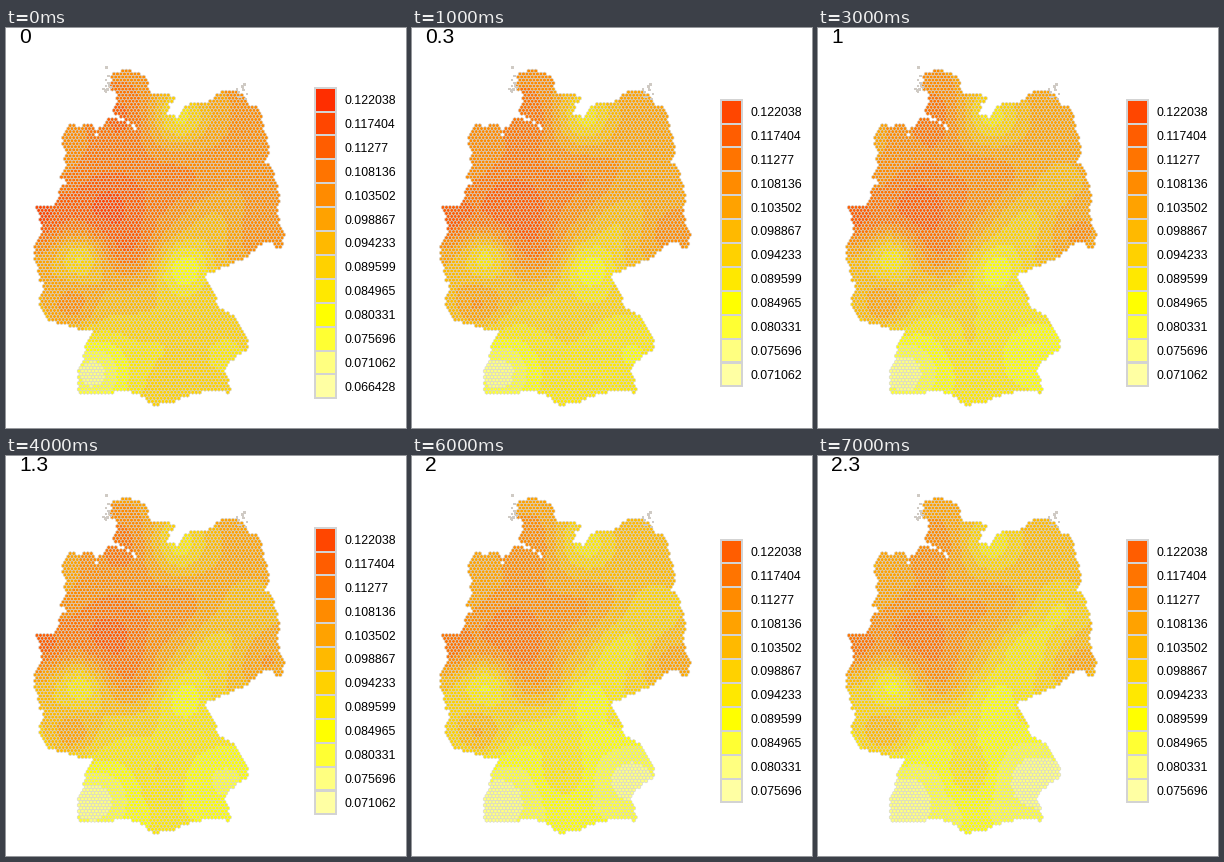
Animation, 400 px wide and 400 px high, one loop 8000 ms. Source, as a matplotlib script:

```python
import numpy as np
import matplotlib.pyplot as plt
from matplotlib.animation import FuncAnimation
from matplotlib.collections import PolyCollection
from matplotlib.patches import Rectangle
from matplotlib.path import Path

SIZE, DPI = 400, 100
PT = 72 / DPI
GREY = "#d3d3d3"
FONT = "Liberation Sans"
FRAMES, LEVELS = 8, 13
DX = 3.5          # width of one hexagon
BOX = 23.9        # height of one legend box
rng = np.random.default_rng(4)

# Key points of the border, clockwise from the north
BORDER = [
    (105, 44), (139, 47), (145, 65), (168, 69), (162, 86), (171, 89),
    (180, 79), (200, 74), (210, 66), (232, 62), (240, 73), (256, 88),
    (263, 124), (259, 133), (268, 146), (271, 185), (279, 207), (273, 222),
    (264, 213), (249, 223), (199, 247), (213, 281), (238, 302), (244, 320),
    (219, 342), (225, 365), (204, 363), (178, 369), (148, 377), (124, 362),
    (100, 367), (72, 366), (76, 333), (89, 303), (45, 294), (38, 287),
    (33, 271), (38, 258), (28, 222), (36, 201), (29, 179), (48, 178),
    (60, 155), (51, 148), (60, 140), (57, 108), (64, 97), (85, 96),
    (90, 109), (104, 90), (120, 94), (130, 103), (124, 93), (107, 84),
    (112, 67), (104, 58),
]

# x, y, radius, height at the start, change of height per unit of progress
BUMPS = [
    (101, 180, 31, 3.2, -0.1), (116, 88, 26, 2.1, 0), (126, 225, 20, 1.6, -0.1),
    (172, 88, 22, -3.8, 0.6), (32, 188, 20, 3, 0), (75, 228, 17, -3.3, 0.3),
    (66, 280, 19, 2.4, 0.25), (178, 240, 20, -4, 1.1), (207, 195, 22, -1.4, -0.4),
    (258, 207, 20, 1.2, 0), (243, 155, 24, 0, -0.9), (172, 152, 26, 1.2, 0),
    (86, 345, 27, -4, 1), (152, 318, 16, -0.6, 1.2), (220, 322, 27, -0.8, -0.7),
]


def roughen(points, rounds=2):
    """Split each side and push its middle a little way off the line."""
    pts = np.array(points, float)
    for _ in range(rounds):
        side = np.roll(pts, -1, axis=0) - pts
        normal = side[:, ::-1] * (1, -1)
        push = rng.uniform(-0.12, 0.12, (len(pts), 1))
        middle = pts + side / 2 + normal * push
        pts = np.stack([pts, middle], axis=1).reshape(-1, 2)
    return pts


def hex_centers():
    x, y = np.meshgrid(np.arange(24, 284, DX),
                       np.arange(40, 382, DX * np.sqrt(3) / 2))
    x[1::2] += DX / 2
    pts = np.column_stack([x.ravel(), y.ravel()])
    return pts[Path(roughen(BORDER)).contains_points(pts)]


def field(pts, u):
    """Colour step over the map: a fall to the south plus soft bumps."""
    x, y = pts.T
    south = 1 / (1 + np.exp(-(y - 255) / 25))
    value = 7.7 - 0.7 * u - (2.7 + 0.5 * u) * south
    for bx, by, r, height, change in BUMPS:
        d2 = (x - bx) ** 2 + (y - by) ** 2
        value += (height + change * u) * np.exp(-d2 / (2 * r * r))
    return value


def palette():
    """Pale yellow, through yellow, to red."""
    pale = [(1, 1, b) for b in (0.64, 0.5, 0.2)]
    return np.array(pale + [(1, 1 - k / 11, 0) for k in range(10)])


def level_text(k):
    return f"{0.0664281 + k * 0.00463418:.6f}".rstrip("0")


COLORS = palette()
centers = hex_centers()

fig = plt.figure(figsize=(SIZE / DPI, SIZE / DPI), dpi=DPI, facecolor="white")
ax = fig.add_axes([0, 0, 1, 1])
ax.set_xlim(0, SIZE)
ax.set_ylim(SIZE, 0)
ax.axis("off")

angle = np.pi / 6 + np.arange(6) * np.pi / 3
corners = DX / np.sqrt(3) * np.column_stack([np.cos(angle), np.sin(angle)])
cells = PolyCollection(centers[:, None] + corners, edgecolors=GREY,
                       linewidths=0.6 * PT)
ax.add_collection(cells)

# Small islands off both coasts
for cx, cy in [(99, 53), (236, 62)]:
    for x, y in rng.normal((cx, cy), (3, 5), (12, 2)):
        ax.add_patch(Rectangle((x, y), 2.4, 2.4, fc="#cfcac4", lw=0))

title = ax.text(13, 15, "", family=FONT, fontsize=21 * PT)
keys, labels = [], []
for color in COLORS:
    keys.append(ax.add_patch(Rectangle((308.8, 0), 21.4, BOX, fc=color,
                                       ec=GREY, lw=2 * PT)))
    labels.append(ax.text(338.5, 0, "", family=FONT, fontsize=12.4 * PT))


def draw(i):
    lowest = int(i > 0) + int(i >= 6)
    count = LEVELS - lowest
    title.set_text(f"{round(i / 3, 1):g}")

    # The colours jump whenever the lowest level drops out
    step = np.rint(field(centers, 0.2 * i + 0.3 * lowest))
    cells.set_facecolor(COLORS[np.clip(step, 0, count - 1).astype(int)])

    bottom = 215 + count * BOX / 2
    for k, (key, label) in enumerate(zip(keys, labels)):
        top = bottom - (k + 1) * BOX
        key.set_y(top)
        label.set_y(top + BOX / 2 + 4.4)
        label.set_text(level_text(k + lowest))
        key.set_visible(k < count)
        label.set_visible(k < count)
    return [cells, title, *keys, *labels]


anim = FuncAnimation(fig, draw, frames=FRAMES, interval=1000,
                     repeat=True, repeat_delay=0, blit=False)
plt.show()
```
